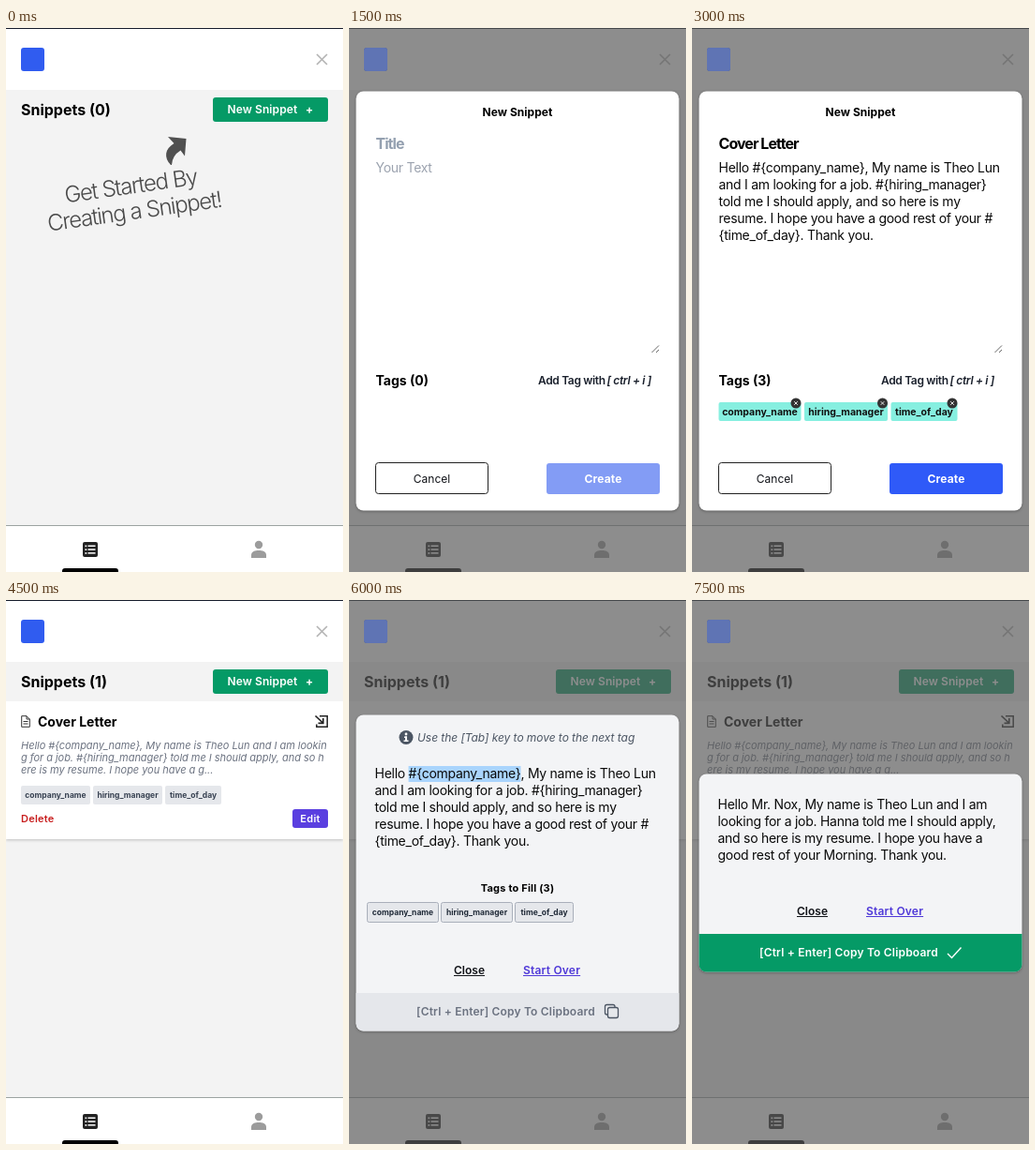
An HTML page with a canvas for the animation above (9 s loop, 360 by 580 pixels).

```html
<!DOCTYPE html>
<html lang="en">
<head>
<meta charset="utf-8">
<title>Snippets</title>
<style>
html, body { margin: 0; width: 100%; height: 100%; overflow: hidden; background: #f3f3f3; }
canvas { display: block; width: 360px; height: 580px; }
</style>
</head>
<body>
<canvas id="stage"></canvas>
<script>
const W = 360, H = 580, SCENE_MS = 1500;
const canvas = document.getElementById('stage');
const ctx = canvas.getContext('2d');
const dpr = window.devicePixelRatio || 1;
canvas.width = W * dpr;
canvas.height = H * dpr;

const GREEN = '#059a66', BLUE = '#305cf0', INK = '#111318', GRAY = '#6b7280';
const TAGS = ['company_name', 'hiring_manager', 'time_of_day'];
const TEMPLATE = [
  'Hello #{company_name}, My name is Theo Lun',
  'and I am looking for a job. #{hiring_manager}',
  'told me I should apply, and so here is my',
  'resume. I hope you have a good rest of your #',
  '{time_of_day}. Thank you.'
];
const FILLED = [
  'Hello Mr. Nox, My name is Theo Lun and I am',
  'looking for a job. Hanna told me I should apply,',
  'and so here is my resume. I hope you have a',
  'good rest of your Morning. Thank you.'
];
const PREVIEW = [
  'Hello #{company_name}, My name is Theo Lun and I am lookin',
  'g for a job. #{hiring_manager} told me I should apply, and so h',
  'ere is my resume. I hope you have a g...'
];

function setFont(size, weight = 400, spacing = 0, italic = false) {
  ctx.font = `${italic ? 'italic ' : ''}${weight} ${size}px Inter, sans-serif`;
  ctx.letterSpacing = spacing + 'px';
}

function text(str, x, y, size, weight, color, { ls = 0, align = 'left', italic = false } = {}) {
  setFont(size, weight, ls, italic);
  ctx.textAlign = align;
  ctx.fillStyle = color;
  ctx.fillText(str, x, y);
}

const centered = (str, x, y, size, weight, color, ls = 0) =>
  text(str, x, y, size, weight, color, { ls, align: 'center' });

function rect(x, y, w, h, color) {
  ctx.fillStyle = color;
  ctx.fillRect(x, y, w, h);
}

function box(x, y, w, h, r, fill, stroke, width = 1) {
  ctx.beginPath();
  ctx.roundRect(x, y, w, h, r);
  if (fill) { ctx.fillStyle = fill; ctx.fill(); }
  if (stroke) { ctx.strokeStyle = stroke; ctx.lineWidth = width; ctx.stroke(); }
}

function disc(x, y, r, color) {
  ctx.beginPath();
  ctx.arc(x, y, r, 0, Math.PI * 2);
  ctx.fillStyle = color;
  ctx.fill();
}

function stroke(path, color, width) {
  ctx.strokeStyle = color;
  ctx.lineWidth = width;
  ctx.stroke(new Path2D(path));
}

function fill(path, color) {
  ctx.fillStyle = color;
  ctx.fill(new Path2D(path));
}

function cross(x, y, r, color, width) {
  stroke(`M${x - r} ${y - r}L${x + r} ${y + r}M${x + r} ${y - r}L${x - r} ${y + r}`, color, width);
}

function shadowed(blur, dy, color, draw) {
  ctx.save();
  ctx.shadowColor = color;
  ctx.shadowBlur = blur * dpr;
  ctx.shadowOffsetY = dy * dpr;
  draw();
  ctx.restore();
}

function paragraph(lines, x, y) {
  lines.forEach((line, i) => text(line, x, y + i * 18, 14, 400, '#0a0a0a', { ls: -0.27 }));
}

function logo(color) {
  box(16, 21, 25, 25, 3, color);
}

function page(count) {
  rect(0, 0, W, H, '#f3f3f3');
  rect(0, 0, W, 66, '#fff');
  rect(0, 0, W, 1, '#151c2b');
  logo(BLUE);
  cross(337.5, 33.5, 5.5, '#b3b3b3', 1.6);

  text(`Snippets (${count})`, 16, 93, 16, 700, '#000');
  box(221, 74, 123, 26, 3, GREEN);
  text('New Snippet', 236.5, 91, 12, 600, '#fff', { ls: 0.1 });
  centered('+', 324, 91, 12, 700, '#fff');

  rect(0, 530, W, 50, '#fff');
  rect(0, 530, W, 1, '#9ca3a1');
  box(82, 548, 16, 16, 2, '#222');
  for (const y of [551.5, 555.3, 559.1]) {
    rect(84.5, y, 1.7, 1.7, '#fff');
    rect(87.5, y, 8, 1.5, '#fff');
  }
  disc(270, 551, 4.2, '#9c9c9c');
  fill('M262 565V562C262 558 266 557 270 557S278 558 278 562V565Z', '#9c9c9c');
  box(60, 576, 60, 6, 3, '#000');
}

function hint() {
  ctx.save();
  ctx.translate(135, 181.5);
  ctx.rotate(-8 * Math.PI / 180);
  ctx.scale(2, 2);
  centered('Get Started By', 0, -2.5, 12, 300, '#4a4a4a', -0.67);
  centered('Creating a Snippet!', 0, 11.2, 12, 300, '#4a4a4a', -0.67);
  ctx.restore();
  fill('M173 116L192.5 118L191 136.5L186.5 130.5Q177.5 136 177 146H176C168.500 138 169.500 129 179.500 123Z', '#505050');
}

function card() {
  shadowed(3, 1, 'rgba(0,0,0,.22)', () => rect(0, 108, W, 147, '#fff'));
  rect(0, 104, W, 4, '#f3f3f3');

  stroke('M16.700 123.700H22L25.300 127V135.300H16.700ZM22 123.700V127H25.300M18.500 129.500H23.500M18.500 132H23.500', '#333', 1);
  text('Cover Letter', 34, 135, 14, 700, '#000');
  stroke('M335 123.800H343.200V135.200H331.800V132.500', '#222', 1.5);
  stroke('M330.500 123.500L338.500 131M338.800 126V131.300H333.500', '#222', 1.7);

  PREVIEW.forEach((line, i) => text(line, 16, 159 + i * 13, 11, 400, GRAY, { ls: -0.04, italic: true }));
  [[16, 74], [93, 74], [170, 60]].forEach(([x, w], i) => {
    box(x, 198, w, 20, 2, '#e5e7eb');
    centered(TAGS[i], x + w / 2, 211, 8.5, 700, '#374151');
  });
  text('Delete', 16, 237, 11, 600, '#c81e1e', { ls: 0.25 });
  box(306, 223, 38, 20, 3, '#5a3fe0');
  centered('Edit', 325, 237, 11, 600, '#fff', 0.25);
}

function dim() {
  rect(0, 0, W, H, 'rgba(91,91,91,.69)');
  logo('#5f74b4');
}

function panel(y, h, color) {
  shadowed(3, 1, 'rgba(0,0,0,.3)', () => box(7.5, y - 0.5, 345, h + 1, 8, color));
}

function editor(filled) {
  dim();
  panel(68, 446, '#fff');
  centered('New Snippet', 180, 94, 12, 700, '#000', 0.05);
  text(filled ? 'Cover Letter' : 'Title', 28.5, 129, 16, 700, filled ? '#000' : '#94a0b0', { ls: -0.95 });
  if (filled) paragraph(TEMPLATE, 28.5, 154);
  else text('Your Text', 28.5, 154, 14, 400, '#9ca3af', { ls: -0.27 });
  stroke('M323.500 346L331 338.500M328 346L331 343', '#555', 0.9);

  text(`Tags (${filled ? 3 : 0})`, 28.5, 381, 14, 700, '#000');
  text('Add Tag with', 202, 380, 12, 600, '#1a202c', { ls: -0.35 });
  text('[ ctrl + i ]', 275.5, 380, 12, 600, '#1a202c', { ls: -0.35, italic: true });
  if (filled) {
    [[28.5, 88], [120, 89], [212.5, 71]].forEach(([x, w], i) => {
      box(x, 399, w, 20, 2, '#86efe0');
      centered(TAGS[i], x + w / 2, 412.5, 10.5, 700, '#111');
      disc(x + w - 5.5, 400, 5.5, '#333');
      cross(x + w - 5.5, 400, 1.8, '#e5e5e5', 1);
    });
  }

  box(28.5, 463.5, 120, 33, 3, '#fff', '#222');
  centered('Cancel', 88.5, 485, 12, 400, INK);
  box(211, 464, 121, 33, 3, filled ? '#2f5af8' : '#839cf5');
  centered('Create', 271.5, 485, 12, 700, '#fff', 0.15);
}

function link(str, x, y, color, ls) {
  text(str, x, y, 12, 600, color, { ls });
  rect(x, y + 1, ctx.measureText(str).width, 1, color);
}

// Links and copy bar shared by both fill dialogs; y is the bar's top edge.
function actions(y, barColor, textColor) {
  link('Close', 112, y - 20, INK, 0);
  link('Start Over', 186, y - 20, '#4f39d8', 0.2);
  box(7.5, y, 345, 40.5, [0, 0, 8, 8], barColor);
  text('[Ctrl + Enter] Copy To Clipboard', 72, y + 24, 12, 600, textColor, { ls: 0.18 });
}

function fillTags() {
  dim();
  panel(123, 336, '#f3f4f6');
  disc(61, 146.5, 7.5, '#4b5563');
  disc(61, 143, 1.4, '#fff');
  rect(59, 145.5, 3, 1.5, '#fff');
  rect(60, 145.5, 2, 5, '#fff');
  rect(58.5, 149.5, 5, 1.5, '#fff');
  text('Use the [Tab] key to move to the next tag', 73, 150.5, 12, 400, '#4b5563', { ls: -0.05, italic: true });

  setFont(14, 400, -0.27);
  const start = 27.5 + ctx.measureText('Hello ').width;
  rect(start, 177, ctx.measureText('#{company_name}').width, 17, '#a9d4fd');
  paragraph(TEMPLATE, 27.5, 190);

  centered('Tags to Fill (3)', 180, 311, 11, 700, '#000', 0.2);
  [[19.5, 76], [98.5, 76], [177.5, 62]].forEach(([x, w], i) => {
    box(x, 322.5, w, 21, 2, '#e5e7eb', '#a9afba');
    centered(TAGS[i], x + w / 2, 336, 8.5, 700, '#1f2937');
  });

  actions(419, '#e5e7eb', GRAY);
  box(273.5, 431.5, 10.5, 10.5, 2, null, '#4b5563', 1.3);
  box(276.5, 434.5, 11, 11, 2, '#e5e7eb', '#4b5563', 1.3);
}

function copied() {
  dim();
  panel(186, 210, '#f3f4f6');
  paragraph(FILLED, 27.5, 223);
  actions(356, GREEN, '#fff');
  stroke('M273 377L277.500 381.500L287.500 370.500', '#fff', 1.4);
}

const scenes = [
  () => { page(0); hint(); },
  () => { page(0); editor(false); },
  () => { page(0); editor(true); },
  () => { page(1); card(); },
  () => { page(1); card(); fillTags(); },
  () => { page(1); card(); copied(); }
];

function frame() {
  const i = Math.floor(performance.now() / SCENE_MS) % scenes.length;
  ctx.setTransform(dpr, 0, 0, dpr, 0, 0);
  scenes[i]();
  requestAnimationFrame(frame);
}
frame();
</script>
</body>
</html>
```
